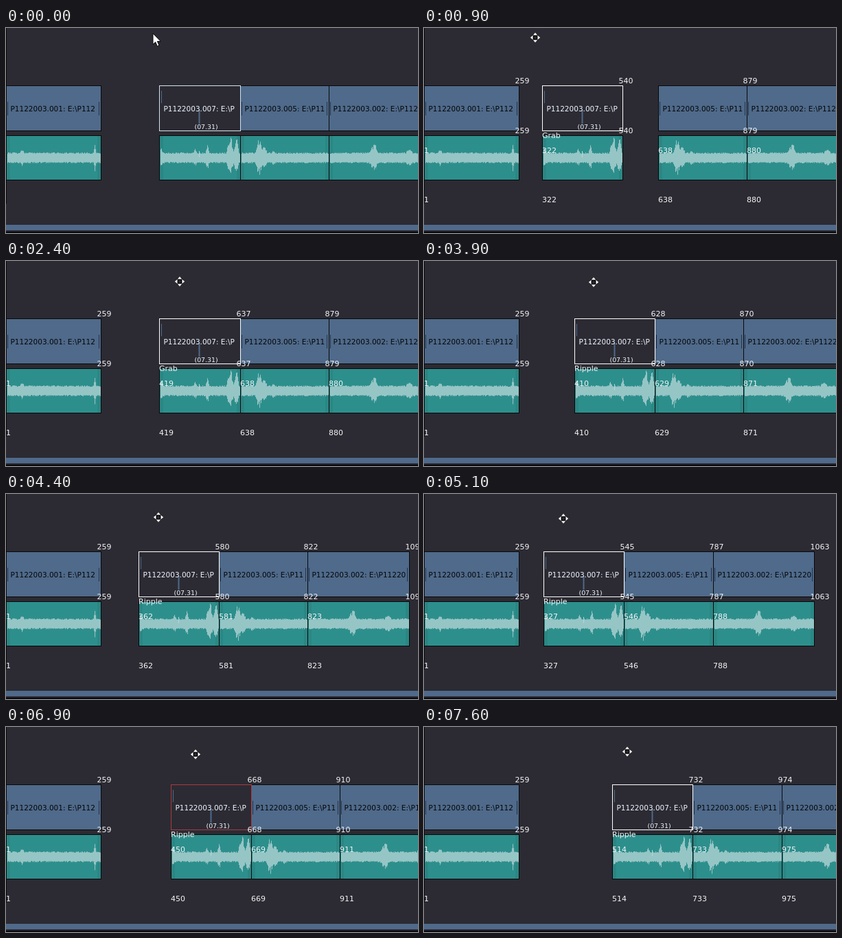
Animation of 600x300 px, one loop 7.7 s. Source, as an HTML page:

```html
<!DOCTYPE html>
<html lang="en">
<head>
<meta charset="utf-8">
<title>Strip editor: grab and ripple</title>
<style>
  html, body { margin: 0; width: 100%; height: 100%; overflow: hidden; background: #2c2b33; }
  #stage { display: block; }
  text { font-family: "DejaVu Sans", sans-serif; white-space: pre; }
  .name { font-size: 10.5px; }
  .label { font-size: 11px; fill: #f4f4f6; }
</style>
</head>
<body>
<svg id="stage" width="600" height="300" viewBox="0 0 600 300"></svg>
<script>
const LOOP = 7700, STEP = 100, HOME = 419, SCALE = 0.5345;
const BACK = '#2c2b33', BLUE = '#4f6a8a', DARK = '#08080b';
const stage = document.getElementById('stage');

function add(parent, tag, attrs, content) {
  const el = document.createElementNS('http://www.w3.org/2000/svg', tag);
  set(el, attrs);
  if (content !== undefined) el.textContent = content;
  parent.appendChild(el);
  return el;
}
function set(el, attrs) {
  for (const k in attrs) el.setAttribute(k, attrs[k]);
}
function show(el, on) { el.style.display = on ? '' : 'none'; }
const toX = frame => Math.round(frame * SCALE - 0.5);

function random(seed) {
  return () => {
    seed = (seed * 16807) % 2147483647;
    return seed / 2147483647;
  };
}

// A noisy band around the middle; each peak is [position, height, width].
function wavePath(width, seed, peaks) {
  const rnd = random(seed);
  let top = '', bottom = '';
  for (let x = 2; x < width; x++) {
    const bump = Math.max(...peaks.map(([at, height, spread]) =>
      height * Math.exp(-(((x - at) / spread) ** 4))));
    const up = 6 + rnd() * 2 + bump * (0.4 + 0.6 * rnd());
    const down = 6 + rnd() * 2 + bump * (0.3 + 0.5 * rnd());
    top += `L${x} ${(33 - up).toFixed(1)}h1`;
    bottom = `L${x + 1} ${(33 + down).toFixed(1)}h-1` + bottom;
  }
  return 'M2 33' + top + bottom + 'Z';
}

const specs = [
  { id: '001', length: 259, tail: 'P112', peaks: [[23, 6, 2], [129, 18, 1]] },
  { id: '005', length: 242, tail: 'P11', peaks: [[27, 23, 4], [33, 9, 5], [48, 4, 2]] },
  { id: '002', length: 276, tail: 'P11220', peaks: [[65, 14, 5], [117, 5, 4]] },
  { id: '007', length: 219, tail: 'P', selected: true,
    peaks: [[2, 7, 2], [52, 6, 2], [70, 12, 2], [103, 24, 4], [112, 22, 3]] }
];

add(stage, 'rect', { width: 600, height: 300, fill: BACK });
add(stage, 'rect', { y: 288, width: 600, height: 8, fill: BLUE });
add(stage, 'rect', { y: 298, width: 600, height: 2, fill: DARK });

function makeStrip({ id, length, tail, selected, peaks }) {
  const g = add(stage, 'g', {});
  const ink = selected ? '#eef5ff' : '#050608';

  const video = add(g, 'svg', { y: 84, height: 67 });
  const frame = add(video, 'rect', {
    x: 0.5, y: 0.5, height: 66, fill: selected ? BACK : BLUE, stroke: DARK
  });
  if (selected) {
    add(video, 'path', { d: 'M3.5 8V26', stroke: BLUE });
    add(video, 'path', { d: 'M58.5 36V56', stroke: BLUE, 'stroke-width': 2 });
    add(video, 'text', { x: 51.5, y: 63.5, 'font-size': 9.4, fill: ink }, '(07.31)');
  } else {
    for (const [x, dx] of [[0, 2.5], ['100%', -3.5]])
      add(video, 'line', {
        x1: x, x2: x, y1: 24, y2: 44, transform: `translate(${dx} 0)`, stroke: '#26344c'
      });
  }
  add(video, 'text', { x: 6.5, y: 38, class: 'name', fill: ink }, `P1122003.${id}: E:\\${tail}`);

  const audio = add(g, 'svg', { y: 157, height: 66 });
  add(audio, 'rect', { width: '100%', height: 66, fill: '#2d8f8c' });
  for (const [x, dx] of [[0, 0], ['100%', -6]])
    add(audio, 'rect', { x, width: 6, height: 66, transform: `translate(${dx} 0)`, fill: '#2b8784' });
  add(audio, 'path', { d: wavePath(length * SCALE, length, peaks), fill: '#96c5c5' });
  if (selected) add(audio, 'path', { d: 'M58.5 23V32', stroke: '#b4d6d8' });
  const border = add(audio, 'rect', { x: 0.5, y: 0.5, height: 65, fill: 'none', stroke: DARK });

  return { g, length, frame, panels: [video, audio], boxes: [frame, border] };
}

const strips = specs.map(makeStrip);
add(stage, 'path', { d: 'M0.5 0V257', stroke: DARK });

const overlay = add(stage, 'g', {});
const label = y => add(overlay, 'text', { y, class: 'label' });
for (const s of strips) {
  s.ends = [81, 154].map(label);
  s.starts = [183, 255].map(label);
}
const modeText = label(160.5);

const arrow = add(stage, 'path', {
  d: 'M0 0V16L3.7 12.6L6.3 18.6L9 17.4L6.4 11.6H11.3Z',
  fill: '#fff', stroke: DARK, 'stroke-linejoin': 'round'
});
const mover = add(stage, 'g', {});
add(mover, 'circle', { r: 5.5, fill: DARK });
add(mover, 'circle', { r: 2, fill: BACK });
for (let a = 0; a < 360; a += 90)
  add(mover, 'path', {
    d: 'M0 -7.5L3.8 -3.2H-3.8Z', transform: `rotate(${a})`,
    fill: '#fff', stroke: DARK, 'stroke-width': 0.5
  });

const linear = p => p;
const easeOut = p => Math.sin(p * Math.PI / 2);
const easeIn = p => 1 - Math.cos(p * Math.PI / 2);

// Pointer path: time, x, y and the easing that leads there.
const path = [
  [100, 214.6, 8, linear],
  [900, 162.6, 14, easeOut],
  [1700, 214.6, 14, easeIn],
  [1900, 253, 30, linear],
  [3800, 253, 30, linear],
  [5200, 203.5, 36, easeOut],
  [6640, 253, 44, easeIn],
  [7500, 304, 35, easeOut],
  [7600, 296, 36, easeIn]
];

function pointer(t) {
  const i = Math.max(1, path.findIndex(key => key[0] >= t));
  const [t0, x0, y0] = path[i - 1], [t1, x1, y1, ease] = path[i];
  const p = ease(Math.max(0, (t - t0) / (t1 - t0)));
  return { x: x0 + (x1 - x0) * p, y: y0 + (y1 - y0) * p };
}

function modeAt(t) {
  if (t < 100 || (t >= 1700 && t < 2400)) return '';
  return t < 3400 ? 'Grab' : 'Ripple';
}

function render(time) {
  const t = Math.floor(time % LOOP / STEP) * STEP;
  const { x, y } = pointer(t);
  const mode = modeAt(t);
  const origin = pointer(t < 1700 ? 100 : 2400).x;
  const ahead = x > origin + 1;

  // Strips trail the pointer, more so when they push others to the right.
  const pulled = pointer(t - (ahead ? 78 : 15)).x - origin;
  const start = mode ? HOME + Math.round(pulled / SCALE) : HOME;
  const next = (mode === 'Ripple' ? start : HOME) + 219;
  const firsts = [1, next, next + 242, start];

  strips.forEach((s, i) => {
    const first = firsts[i], after = first + s.length;
    const left = toX(first), right = toX(after);
    set(s.g, { transform: `translate(${left} 0)` });
    for (const el of s.panels) set(el, { width: right - left + 1 });
    for (const el of s.boxes) set(el, { width: right - left });
    for (const el of s.starts) {
      set(el, { x: left });
      el.textContent = first;
    }
    for (const el of s.ends) {
      set(el, { x: right - 5.5 });
      el.textContent = after - 1;
    }
  });

  const pushing = mode && ahead && x > pointer(t - STEP).x;
  set(strips[3].frame, { stroke: pushing ? '#a83c42' : mode ? '#fff' : '#d5e4f2' });
  modeText.textContent = mode;
  set(modeText, { x: toX(start) });

  show(overlay, mode);
  show(mover, mode);
  show(arrow, !mode);
  for (const el of [mover, arrow])
    set(el, { transform: `translate(${Math.floor(x)} ${Math.round(y)})` });
}

const began = performance.now();
function tick() {
  render(performance.now() - began);
  requestAnimationFrame(tick);
}
tick();
</script>
</body>
</html>
```
